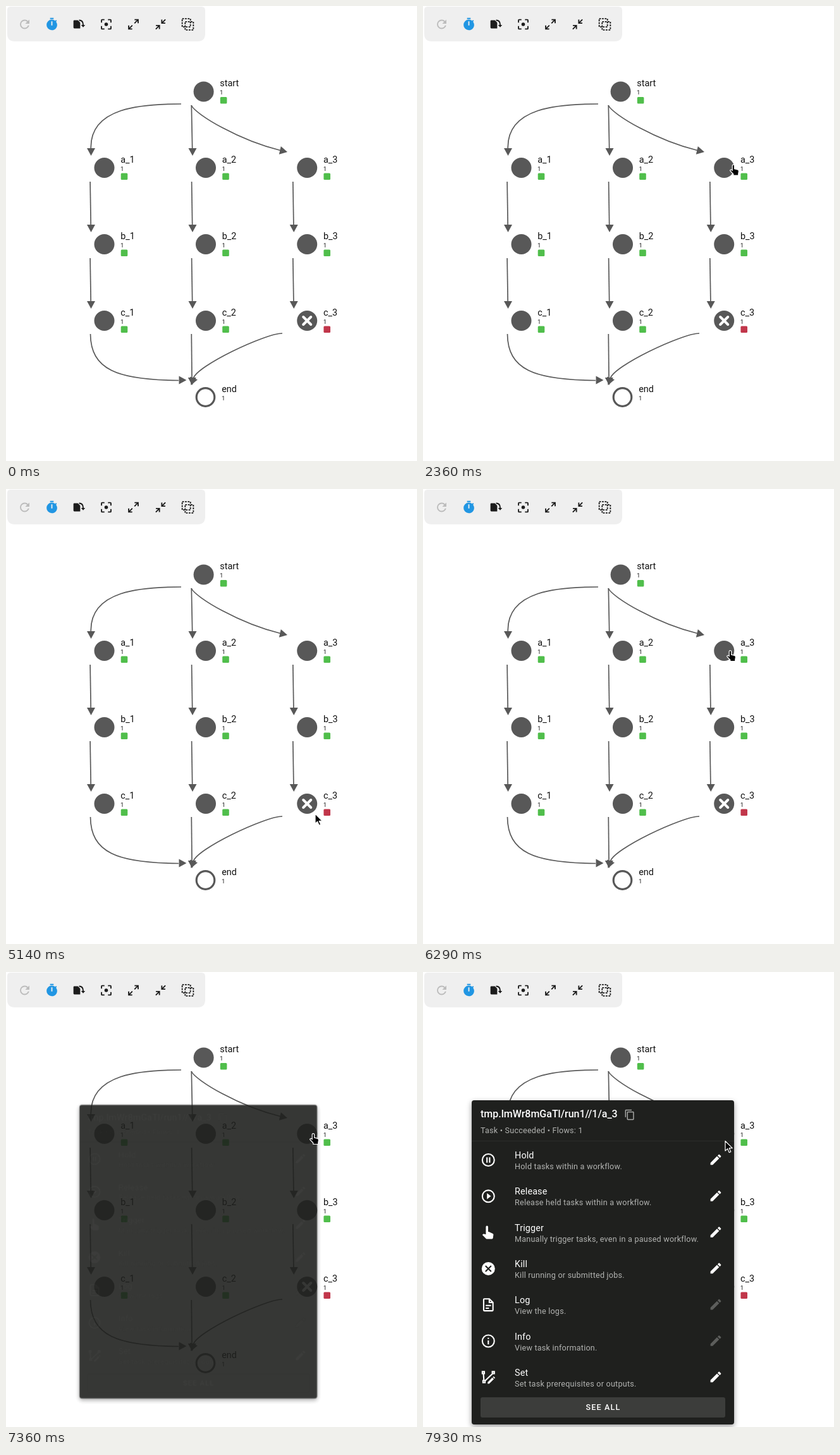
These frames come from a looping animation (650 by 720 pixels, 8000 ms). An HTML page:

```html
<!DOCTYPE html>
<html lang="en">
<head>
<meta charset="utf-8">
<title>Workflow graph</title>
<style>
html, body { margin: 0; width: 100%; height: 100%; overflow: hidden; background: #fff; }
svg { display: block; width: 650px; height: 720px; font-family: Roboto, sans-serif; }
.edge { fill: none; stroke: #5a5a5a; stroke-width: 1.7; }
.head, .node { fill: #585858; }
.label { font-size: 14.4px; fill: #111; }
.cycle { font-size: 9.6px; fill: #222; }
.line { fill: none; stroke: currentColor; stroke-width: 2; }
#menu { color: #fff; fill: #fff; }
.card { fill: #1f201e; filter: drop-shadow(0 3px 4px rgba(0, 0, 0, .4)); }
.title { font-size: 16px; font-weight: 500; }
.item { font-size: 14.4px; letter-spacing: .13px; }
.sub { font-size: 12.6px; letter-spacing: .22px; fill: #b2b3b1; }
.button { font-size: 12.6px; font-weight: 500; letter-spacing: 1.12px; text-anchor: middle; }
#cursor { stroke: #fff; stroke-width: 1.2; stroke-linejoin: round; }
</style>
</head>
<body>
<svg viewBox="0 0 650 720">
  <path fill="#efefef" d="M2 6Q2 1 8 1H309Q315 1 315 7V44Q315 56 303 56H14Q2 56 2 44Z"/>
  <g id="tools"></g>
  <g id="graph"></g>
  <g id="menu">
    <rect class="card" x="77" y="203" width="415" height="513" rx="4"/>
    <g id="content"></g>
  </g>
  <path id="cursor"/>
</svg>
<script>
const $ = id => document.getElementById(id);

const icons = {
  refresh: '<path d="M17.65 6.35C16.2 4.9 14.21 4 12 4A8 8 0 0 0 4 12A8 8 0 0 0 12 20C15.73 20 18.84 17.45 19.73 14H17.65C16.83 16.33 14.61 18 12 18A6 6 0 0 1 6 12A6 6 0 0 1 12 6C13.66 6 15.14 6.69 16.22 7.78L13 11H20V4Z"/>',
  timer: '<path d="M19.03 7.39L20.45 5.97C20 5.46 19.55 5 19.04 4.56L17.62 6C16.07 4.74 14.12 4 12 4A9 9 0 0 0 3 13A9 9 0 0 0 12 22C17 22 21 17.97 21 13C21 10.88 20.26 8.93 19.03 7.39M13 14H11V7H13M15 1H9V3H15Z"/>',
  rotate: '<path d="M4 5H10L14 9V19H4Q2.500 19 2.500 17.500V6.500Q2.500 5 4 5ZM15.500 13H22.500L19 17Z"/><path class="line" d="M12 5Q19 5 19 13"/>',
  focus: '<circle cx="12" cy="12" r="3"/><path class="line" d="M4 9V5Q4 4 5 4H9M15 4H19Q20 4 20 5V9M20 15V19Q20 20 19 20H15M9 20H5Q4 20 4 19V15"/>',
  expand: '<path class="line" d="M4 14V20H10M4 20L10.200 13.800M14 4H20V10M20 4L13.800 10.200"/>',
  collapse: '<path class="line" d="M14 4V10H20M14 10L20.200 3.800M4 14H10V20M10 14L3.800 20.200"/>',
  group: '<path class="line" stroke-dasharray="3 1.700" d="M2.500 2.500H16.500V16.500H2.500ZM7.500 7.500H21.500V21.500H7.500Z"/>',
  hold: '<circle class="line" cx="12" cy="12" r="9"/><path d="M9 8h2v8h-2zM13 8h2v8h-2z"/>',
  release: '<circle class="line" cx="12" cy="12" r="9"/><path d="M10 7.500L16 12L10 16.500Z"/>',
  trigger: '<path d="M10 2a1.700 1.700 0 0 1 1.700 1.700V11l1.500.2 5.500 2.600a1.800 1.800 0 0 1 1 1.900L19 20.400a2 2 0 0 1-2 1.600h-7a2 2 0 0 1-1.400-.6L3 15.700l1-1c.4-.4.9-.5 1.400-.4L8.300 15V3.700A1.700 1.700 0 0 1 10 2z"/>',
  kill: '<circle cx="12" cy="12" r="10"/><path class="line" style="stroke:#1f201e" d="M7.700 7.700L16.300 16.300M16.300 7.700L7.700 16.300"/>',
  log: '<path class="line" d="M6 3H13.500L19 8.500V20Q19 21 18 21H6Q5 21 5 20V4Q5 3 6 3M13.500 3V8.500H19M8 13H16M8 17H13"/>',
  info: '<circle class="line" cx="12" cy="12" r="9"/><path d="M11 7h2v2h-2zM11 11h2v6h-2z"/>',
  set: '<path class="line" d="M3 3.500h3v3h-3zM4 17h3v3h-3zM18 3.500h3v3h-3zM4.600 6.500L5.400 17M7 17.500L18.500 6.500"/><path d="M11 21.800V19.500L18 12.500L20.300 14.800L13.300 21.800ZM18.800 11.700L20 10.500L22.300 12.800L21.100 14Z"/>',
  pencil: '<path d="M20.710 7.040C21.100 6.650 21.100 6 20.710 5.630L18.370 3.290C18 2.900 17.350 2.900 16.960 3.290L15.120 5.120L18.870 8.870M3 17.250V21H6.750L17.810 9.930L14.060 6.180Z"/>',
  copy: '<path class="line" d="M8 6H19Q20 6 20 7V21Q20 22 19 22H8Q7 22 7 21V7Q7 6 8 6M3 17V3Q3 2 4 2H16"/>'
};

const icon = (name, x, y, scale, color) =>
  `<g transform="translate(${x} ${y}) scale(${scale}) translate(-12 -12)" fill="${color}" color="${color}">${icons[name]}</g>`;
const text = (cls, x, y, str) => `<text class="${cls}" x="${x}" y="${y}">${str}</text>`;
const edge = (d, x, y, angle = 0) =>
  `<path class="edge" d="${d}"/><path class="head" transform="translate(${x} ${y}) rotate(${angle})" d="M0 0L-6.500 -12H6.500Z"/>`;

function node(name, x, y, state) {
  const shape = state === 'waiting'
    ? `<circle cx="${x}" cy="${y}" r="14.300" fill="#fff" stroke="#585858" stroke-width="3.200"/>`
    : `<circle class="node" cx="${x}" cy="${y}" r="16"/>`;
  const cross = state === 'failed'
    ? `<path d="M${x - 6} ${y - 6}l12 12m0-12l-12 12" stroke="#fff" stroke-width="4" stroke-linecap="round"/>` : '';
  const job = state === 'waiting' ? ''
    : `<rect x="${x + 26.2}" y="${y + 8.500}" width="10.600" height="10.400" rx="1.500" fill="${state === 'failed' ? '#c1364a' : '#50be4b'}"/>`;
  return shape + cross + text('label', x + 25.700, y - 8.300, name) + text('cycle', x + 25.500, y + 4.800, 1) + job;
}

const columns = [155.500, 316, 476.200], rows = [256, 377, 498];

function drawGraph() {
  let out = edge('M277 155C215 155 132 160 134.300 226', 134.500, 237)
    + edge('M293.300 157L294.700 226', 295, 237)
    + edge('M293 157C300 172 370 213 434 228.500', 445, 231, -77)
    + edge('M133.500 519C134 575 175 592 273 592.500', 285.500, 592, -90)
    + edge('M293.300 519L294 588', 294.300, 600)
    + edge('M437 518C410 518 300 570 296 590', 292.500, 600, 22);
  out += node('start', 312.600, 135.500) + node('end', 315.500, 619, 'waiting');
  columns.forEach((x, c) => rows.forEach((y, r) => {
    out += node(`${'abc'[r]}_${c + 1}`, x, y, c === 2 && r === 2 ? 'failed' : 'done');
    if (r < 2) out += edge(`M${x - 22.400} ${y + 22}L${x - 21.300} ${y + 91}`, x - 21, y + 102);
  }));
  $('graph').innerHTML = out;
}

function drawTools() {
  const names = ['refresh', 'timer', 'rotate', 'focus', 'expand', 'collapse', 'group'];
  const color = { refresh: '#bcbcbc', timer: '#2196e3' };
  $('tools').innerHTML = names.map((n, i) => icon(n, 29.500 + 43 * i, 29, .93, color[n] || '#1c1c1c')).join('');
}

function drawMenu() {
  const items = [
    ['Hold', 'Hold tasks within a workflow.'],
    ['Release', 'Release held tasks within a workflow.'],
    ['Trigger', 'Manually trigger tasks, even in a paused workflow.'],
    ['Kill', 'Kill running or submitted jobs.'],
    ['Log', 'View the logs.'],
    ['Info', 'View task information.'],
    ['Set', 'Set task prerequisites or outputs.']
  ];
  let out = text('title', 91, 230, 'tmp.lmWr8mGaTl/run1//1/a_3')
    + icon('copy', 327, 226, .74, '#a8a9a7')
    + text('sub', 91, 255, 'Task • Succeeded • Flows: 1')
    + '<path d="M77 267.500H492" stroke="#2c2d2b"/>';
  items.forEach(([name, info], i) => {
    const y = 297.500 + 57.300 * i;
    out += icon(name.toLowerCase(), 103.300, y, 1.050, '#fff')
      + text('item', 145, y - 2.500, name) + text('sub', 145, y + 14.500, info)
      + icon('pencil', 463, y - .5, .93, name === 'Log' || name === 'Info' ? '#5d5e5c' : '#fff');
  });
  out += '<rect x="91" y="673" width="387" height="32" rx="3" fill="#3c3d3b"/>'
    + text('button', 285, 693, 'SEE ALL');
  $('content').innerHTML = out;
}

const clamp = v => Math.max(0, Math.min(1, v));

// cubic-bezier(x1, 0, .2, 1)
function ease(x, x1) {
  let lo = 0, hi = 1;
  for (let i = 0; i < 24; i++) {
    const u = (lo + hi) / 2, v = 1 - u;
    if (3 * v * v * u * x1 + .6 * v * u * u + u * u * u < x) lo = u; else hi = u;
  }
  return lo * lo * (3 - 2 * lo);
}

const LOOP = 8000, STEP = LOOP / 112, OPEN = 100 * STEP;
const HAND = 'M-1.800 1.200c0-2.200 3.400-2.200 3.400 0v5l5 1.200c1.400.4 1.900 1.200 1.800 2.600l-.6 4v2.500h-8v-2L-5 9.500c-.9-1.400 1-2.800 2.200-1.600l1 1z';
const ARROW = 'M0 0V15.500l3.600-3.400 2.600 6 2.600-1.100-2.600-5.800h5z';
// time, x, y
const path = [
  [500, 607, 285], [570, 588, 286], [1080, 588, 286], [1200, 587, 286], [1430, 587, 286],
  [2290, 491, 251.500], [2570, 491, 251.500], [3400, 491, 364], [3780, 490.500, 365.500],
  [4000, 490.500, 365.500], [4860, 489, 490], [5290, 489, 523], [5360, 489, 523],
  [6210, 486, 256], [7430, 486, 256], [7920, 478, 267.500]
];

function cursorAt(t) {
  const i = path.findIndex(p => p[0] > t);
  if (i < 0) return path[path.length - 1].slice(1);
  const [a, b] = [path[i - 1], path[i]];
  const u = (t - a[0]) / (b[0] - a[0]), k = u * u * (3 - 2 * u);
  return [a[1] + (b[1] - a[1]) * k, a[2] + (b[2] - a[2]) * k];
}

function render(time) {
  const t = Math.floor((time % LOOP + 8) / STEP) % 112 * STEP;

  const shown = t >= 500 - 1;
  $('cursor').style.display = shown ? '' : 'none';
  if (shown) {
    const [x, y] = cursorAt(Math.max(t, 500));
    const over = t < 7400 && columns.some(cx => rows.some(cy => Math.hypot(x - cx, y - cy) < 17));
    $('cursor').setAttribute('d', over ? HAND : ARROW);
    $('cursor').setAttribute('transform', `translate(${x} ${y})`);
  }

  const open = ease(clamp((t - OPEN) / 365), 0);
  const scale = .1 + .9 * open;
  $('menu').style.display = t > OPEN + 1 ? '' : 'none';
  $('menu').setAttribute('opacity', open);
  $('menu').setAttribute('transform', `translate(492 279) scale(${scale}) translate(-492 -279)`);
  $('content').setAttribute('opacity', clamp((ease(clamp((t - OPEN) / 730), .4) - .33) / .67));
}

drawTools();
drawGraph();
drawMenu();
const begin = performance.now();
function tick() {
  render(performance.now() - begin);
  requestAnimationFrame(tick);
}
tick();
</script>
</body>
</html>
```
